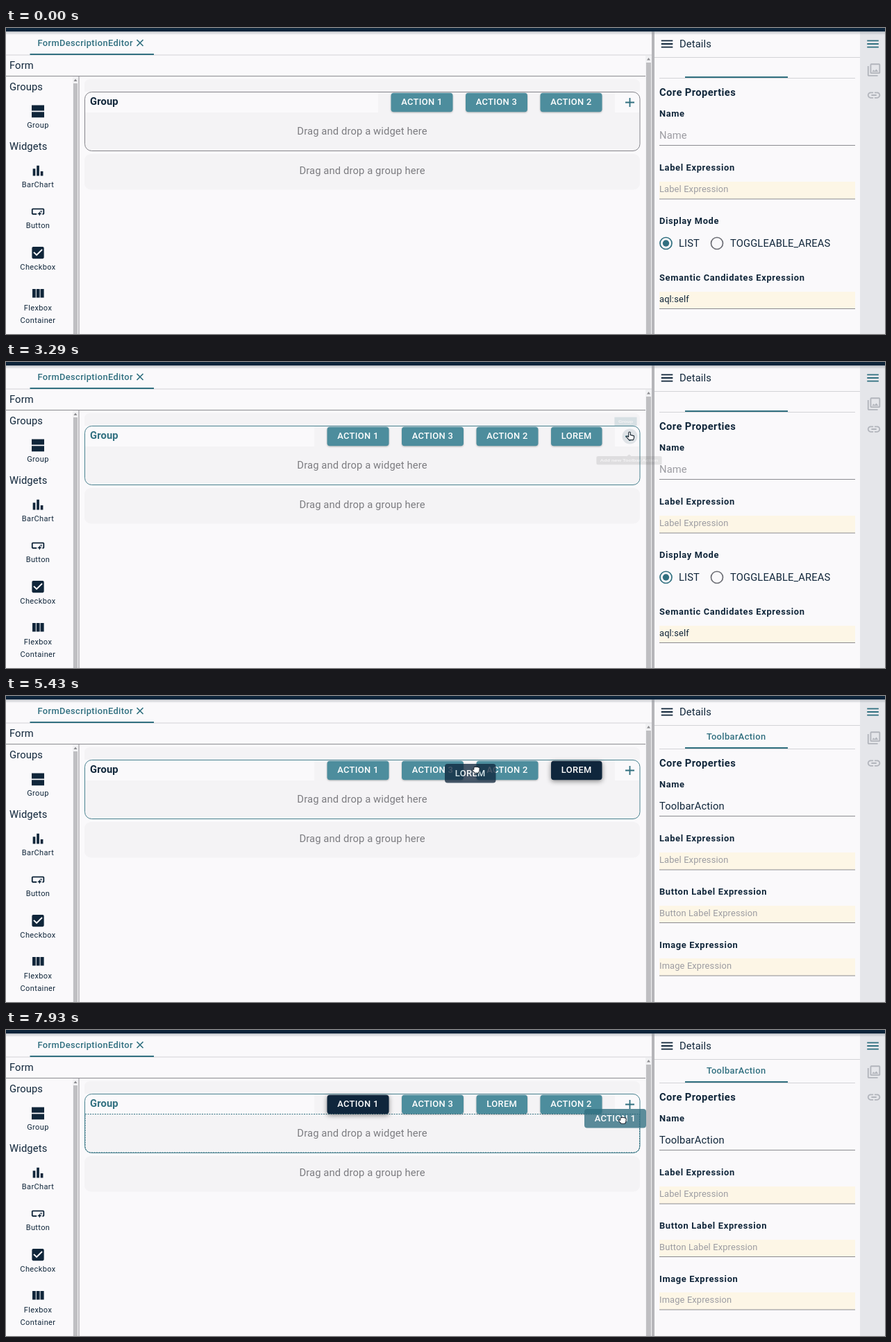
Animation of 1266 by 442 pixels, one loop 8 s. Source, as an HTML page:

```html
<!DOCTYPE html>
<html lang="en">
<head>
<meta charset="utf-8">
<title>Form editor</title>
<style>
html, body { margin: 0; width: 100%; height: 100%; overflow: hidden; background: #faf9fb; }
svg { display: block; width: 100vw; height: 100vh; }
text { font: 14.72px Roboto, sans-serif; letter-spacing: .14px; fill: #10263a; }
.s { font-size: 12.88px; }
.b { font-size: 12.88px; font-weight: 700; letter-spacing: .65px; }
.h { font-weight: 700; }
.m { font-size: 12.88px; font-weight: 500; letter-spacing: .37px; }
.c { font-size: 11.04px; letter-spacing: .37px; text-anchor: middle; }
.tip { font-size: 9.9px; font-weight: 500; letter-spacing: .05px; text-anchor: middle; fill: #fff; }
.mid { text-anchor: middle; }
.hint { fill: #9c9ca2; }
.drop { fill: #7c7c80; text-anchor: middle; }
.teal { fill: #317080; }
.zone { fill: #f4f3f5; }
.field { fill: #fdf6e6; }
.rule { stroke: #8b8b90; }
.thin { stroke: #d3d3d7; }
.white { fill: #fff; }
.pointer { fill: #fff; stroke: #1c2733; stroke-width: 1.1; stroke-linejoin: round; }
</style>
</head>
<body>
<svg viewBox="0 0 1266 442" preserveAspectRatio="none">
  <defs>
    <linearGradient id="shade" x2="0" y2="1">
      <stop stop-color="#8f959d" stop-opacity=".55"/><stop offset="1" stop-color="#8f959d" stop-opacity="0"/>
    </linearGradient>
    <path id="menu" d="M3 18h18v-2H3v2zm0-5h18v-2H3v2zm0-7v2h18V6H3z"/>
    <clipPath id="face"><rect width="73.5" height="27.5" rx="4"/></clipPath>
  </defs>
  <rect width="1266" height="442" fill="#faf9fb"/>

  <!-- editor tab and title -->
  <path class="thin" d="M0 39h930"/>
  <text class="m teal" x="45.5" y="26">FormDescriptionEditor</text>
  <path d="M188.500 17l9 9m0-9l-9 9" stroke="#317080" stroke-width="1.7"/>
  <path class="teal" d="M34.500 37h178.500v2h-178.500z"/>
  <text x="5" y="59">Form</text>
  <path class="rule" d="M0 69.500h921"/>

  <!-- palette -->
  <text x="5" y="89.500">Groups</text>
  <text x="5" y="176">Widgets</text>
  <g fill="#10263a">
    <path d="M37 111.500h18v8h-18zm0 9.700h18v8h-18z"/>
    <path transform="translate(35 195) scale(.92)" d="M4 9h4v11H4zm12 4h4v7h-4zm-6-9h4v16h-4z"/>
    <path transform="translate(35 254) scale(.92)" d="M22 9v6c0 1.100-.9 2-2 2h-1v-2h1V9H4v6h6v2H4c-1.100 0-2-.9-2-2V9c0-1.100.9-2 2-2h16c1.100 0 2 .9 2 2zm-7.500 10 1.090-2.410L18 15.500l-2.410-1.090L14.500 12l-1.090 2.410L11 15.500l2.410 1.090L14.500 19zm2.500-5 .62-1.380L19 12l-1.380-.62L17 10l-.62 1.380L15 12l1.380.62L17 14z"/>
    <path transform="translate(34.500 313) scale(.96)" d="M19 3H5c-1.110 0-2 .9-2 2v14c0 1.100.89 2 2 2h14c1.110 0 2-.9 2-2V5c0-1.100-.89-2-2-2zm-9 14l-5-5 1.410-1.410L10 14.170l7.590-7.590L19 8l-9 9z"/>
    <path d="M38 377h4.800v12.500h-4.800zm5.800 0h4.800v12.500h-4.800zm5.800 0h5v12.500h-5z"/>
  </g>
  <text class="c" x="46" y="144">Group</text>
  <text class="c" x="46" y="230">BarChart</text>
  <text class="c" x="46" y="289">Button</text>
  <text class="c" x="46" y="349">Checkbox</text>
  <text class="c" x="46" y="408">Flexbox</text>
  <text class="c" x="46" y="426">Container</text>
  <path fill="#f1f1f3" d="M96 70h8v372h-8zM921 40h9v402h-9z"/>
  <path fill="#bfbfc2" d="M97 80h6v362h-6zM922 50h7v392h-7z"/>
  <path fill="#8b8b8f" d="M97.500 77l2.500-3.500 2.500 3.500zM923 46.500l2.500-3.500 2.500 3.500z"/>
  <path class="rule" d="M105 70v372"/>

  <!-- form -->
  <path class="zone" d="M113 92V82q0-8 8-8H905q8 0 8 8V92z"/>
  <rect class="zone" x="113" y="92" width="800" height="86" rx="10"/>
  <path fill="#faf9fb" d="M114 122V102q0-9 9-9H903q9 0 9 9V122z"/>
  <rect class="zone" id="bar" y="93" height="29"/>
  <rect class="zone" x="113" y="182" width="800" height="51.500" rx="9"/>
  <rect id="frame" x="113.500" y="92.500" width="799.500" height="85" rx="10" fill="none"/>
  <path id="over" d="M114 121.500H912.500V168q0 9-9 9H123q-9 0-9-9z" fill="none" stroke="#317080" stroke-dasharray="2 1.500"/>
  <text class="h" id="title" x="121" y="111">Group</text>
  <text class="drop" x="513" y="154">Drag and drop a widget here</text>
  <text class="drop" x="513" y="210.500">Drag and drop a group here</text>
  <g id="actions"></g>
  <circle id="halo" cx="898.500" cy="107.500" r="11" fill="#dfe3e7"/>
  <path d="M892 107.500h13m-6.500-6.500v13" stroke="#317080" stroke-width="1.800"/>

  <!-- details -->
  <path fill="#b5b5b9" d="M930 5h4v437h-4z"/>
  <use href="#menu" transform="translate(941 12) scale(.92)" fill="#10263a"/>
  <text x="970" y="28">Details</text>
  <path class="thin" d="M934 42.500h296"/>
  <g id="panel">
    <path class="thin" d="M941 72.500h282"/>
    <path class="teal" d="M978 70h148v2h-148z"/>
    <text class="h" x="941" y="98" style="letter-spacing:.4px">Core Properties</text>
    <text class="b" x="941" y="128">Name</text>
    <text id="name" x="941" y="160"></text>
    <text class="b" x="941" y="206">Label Expression</text>
    <path class="field" d="M941 222h282v25h-282z"/>
    <text class="s hint" x="941" y="237">Label Expression</text>
    <path class="rule" d="M941 169.500h282M941 247h282"/>
    <g id="groupForm">
      <text class="b" x="941" y="283">Display Mode</text>
      <circle cx="950.500" cy="311" r="8.500" fill="none" stroke="#317080" stroke-width="1.700"/>
      <circle class="teal" cx="950.500" cy="311" r="4.700"/>
      <circle cx="1024" cy="311" r="8.500" fill="none" stroke="#6d6e75" stroke-width="1.700"/>
      <text x="969" y="316">LIST</text>
      <text x="1043" y="316">TOGGLEABLE_AREAS</text>
      <text class="b" x="941" y="365">Semantic Candidates Expression</text>
      <path class="field" d="M941 381h282v25h-282z"/>
      <text class="s" x="941" y="396">aql:self</text>
      <path class="rule" d="M941 405.500h282"/>
    </g>
    <g id="actionForm">
      <text class="m teal" x="1009" y="59">ToolbarAction</text>
      <text class="b" x="941" y="283">Button Label Expression</text>
      <path class="field" d="M941 299h282v25h-282zm0 76h282v25h-282z"/>
      <text class="s hint" x="941" y="314">Button Label Expression</text>
      <text class="b" x="941" y="360">Image Expression</text>
      <text class="s hint" x="941" y="390">Image Expression</text>
      <path class="rule" d="M941 323.500h282M941 400h282"/>
    </g>
  </g>

  <!-- side bar -->
  <path fill="#e5e6ea" d="M1230 5h36v437h-36z"/>
  <use href="#menu" class="teal" transform="translate(1237.500 12) scale(.92)"/>
  <g fill="#b2b5bc">
    <path transform="translate(1239 49.500) scale(.92)" d="M20 4v12H8V4h12m0-2H8c-1.100 0-2 .9-2 2v12c0 1.100.9 2 2 2h12c1.100 0 2-.9 2-2V4c0-1.100-.9-2-2-2zm-8.500 9.670l1.690 2.260 2.480-3.100L19 15H9zM2 6v14c0 1.100.9 2 2 2h14v-2H4V6H2z"/>
    <path transform="translate(1239 86) scale(.92)" d="M3.900 12c0-1.710 1.390-3.100 3.100-3.100h4V7H7c-2.760 0-5 2.240-5 5s2.240 5 5 5h4v-1.900H7c-1.710 0-3.100-1.390-3.100-3.100zM8 13h8v-2H8v2zm9-6h-4v1.900h4c1.710 0 3.100 1.390 3.100 3.100s-1.390 3.100-3.100 3.100h-4V17h4c2.760 0 5-2.240 5-5s-2.240-5-5-5z"/>
  </g>
  <rect y="5" width="1266" height="5" fill="url(#shade)"/>
  <rect width="1266" height="5" fill="#0c243a"/>

  <g id="groupTip">
    <rect class="teal" x="-20.500" y="-20" width="41" height="20"/>
    <text class="tip" y="-6.500">Group</text>
  </g>
  <g id="addTip">
    <path fill="#616161" d="M-57-0H-4L0-4 4 0H57q3 0 3 3V17q0 3-3 3H-57q-3 0-3-3V3q0-3 3-3z"/>
    <text class="tip" y="13.500">Add new Toolbar Action</text>
  </g>
  <g id="ghost"></g>
  <g id="cursor" class="pointer">
    <path d="M0 0v10.500l2.500-2.200 1.700 3.900 1.700-.8-1.700-3.700h3.400z"/>
    <path d="M0 0c1 0 1.300.6 1.300 1.400v3l4.200 1c1 .2 1.300 1 1.200 1.800l-.6 2.800-.8 1.600h-6l-3.600-4.200c-.6-.8.4-1.700 1.200-1.200l1.800 1V1.400C-1.300.6-1 0 0 0z"/>
    <path d="M-3 1q1-1.500 2-.3 1-1.500 2.200 0 1.200-1 2.200.4 1.600-.4 1.800 1.400l-.3 4-1.400 2.700h-5.500L-5.300 5.500q-.8-1.700 1-1.700l1 .6z"/>
  </g>
</svg>
<script>
const $ = id => document.getElementById(id);
const NAVY = [15, 38, 60], TEAL = [77, 141, 157], HOVER = [57, 118, 136];
const ADD = 3140, CLICK = 4060, DRAG = 4500, DROP = 6250, DRAG2 = 7300;

// time, x, y of the pointer's hot spot
const track = [
  [900, 760, 445], [1150, 800, 190], [1350, 822, 104], [1570, 878, 99], [1700, 898, 101],
  [3330, 898, 101], [3600, 840, 103], [3750, 832, 100], [4300, 832, 100], [DRAG, 830, 98],
  [5000, 740, 103], [5430, 677, 102], [5800, 662, 103], [DROP, 662, 103], [6570, 564, 116],
  [6850, 520, 104], [7000, 517, 106], [DRAG2, 517, 106], [7930, 888, 126]
];

const ramp = (t, from, span) => Math.max(0, Math.min(1, (t - from) / span));
const pulse = (t, from, to, span = 200) => ramp(t, from, span) - ramp(t, to, span);
const mix = (a, b, k) => a.map((v, i) => v + (b[i] - v) * k);
const rgb = c => `rgb(${c.map(Math.round)})`;
const show = (el, on) => el.style.display = on ? '' : 'none';
const move = (el, x, y) => el.setAttribute('transform', `translate(${x} ${y})`);

const face = (label, w) => `<rect width="${w}" height="27.5" rx="4"/>` +
  `<text class="m mid white" x="${w / 2}" y="17.800">${label}</text>`;

function button(label, w) {
  const el = document.createElementNS('http://www.w3.org/2000/svg', 'g');
  el.innerHTML = face(label, w);
  $('actions').append(el);
  return { el, w, label };
}

const one = button('ACTION 1', 89), three = button('ACTION 3', 89),
      two = button('ACTION 2', 89), lorem = button('LOREM', 73.5);
lorem.el.innerHTML += '<circle cx="46" cy="10" fill="#fff" clip-path="url(#face)"/>';
const ripple = lorem.el.lastChild;
const pointers = [...$('cursor').children];
let carried;

function pointerAt(t) {
  const i = track.findIndex(p => p[0] > t);
  if (i < 0) return track.at(-1).slice(1);
  const a = track[Math.max(0, i - 1)], b = track[i];
  const k = ramp(t, a[0], b[0] - a[0]), e = k * k * (3 - 2 * k);
  return [a[1] + (b[1] - a[1]) * e, a[2] + (b[2] - a[2]) * e];
}

function paint(b, hover, focus) {
  b.el.firstChild.style.fill = rgb(mix(mix(TEAL, HOVER, hover), NAVY, focus));
  b.el.style.filter = `drop-shadow(0 ${1 + focus}px ${1 + 2.5 * focus}px rgba(0,0,0,${.25 + .2 * focus}))`;
}

function grow(el, x, y, k) {
  const s = .75 + .25 * k;
  el.setAttribute('transform', `translate(${x} ${y}) scale(${s} ${s * s})`);
  el.style.opacity = k;
}

function carry(b, x, y) {
  if (b !== carried) $('ghost').innerHTML = b ? face(b.label, b.w) : '';
  carried = b;
  if (!b) return;
  const first = b === one;
  $('ghost').style.opacity = first ? .79 : .76;
  $('ghost').firstChild.style.fill = first ? '#316f81' : rgb(NAVY);
  move($('ghost'), x - (first ? 55 : 45), y - (first ? 12 : 4));
}

function draw(t) {
  const [x, y] = pointerAt(t), added = t >= 3250;
  const order = !added ? [one, three, two] : t < 6300 ? [one, three, two, lorem] : [one, three, lorem, two];
  show(lorem.el, added);
  let right = 858.5;
  for (const b of [...order].reverse()) {
    move(b.el, right - b.w, 93.7);
    right -= b.w + 18.5;
  }
  $('bar').setAttribute('x', right);
  $('bar').setAttribute('width', 877 - right);

  paint(one, pulse(t, 6720, 9000), ramp(t, 7150, 150));
  paint(two, pulse(t, 1280, 1550), 0);
  paint(three, pulse(t, 6420, 6560) * .4, 0);
  paint(lorem, pulse(t, 3550, CLICK), pulse(t, CLICK - 60, 6480, 210));
  ripple.setAttribute('r', 17 * ramp(t, CLICK, 130));
  ripple.style.opacity = .25 * pulse(t, CLICK, 4330);

  const holding = t >= DRAG && t < DROP || t >= DRAG2;
  carry(holding ? t < DROP ? lorem : one : null, x, y);
  show($('over'), t > DRAG2 && y > 121);
  $('frame').style.stroke = t > 1130 ? '#4a8391' : '#85858b';
  $('title').style.fill = t >= ADD && t < CLICK || t > 7430 ? '#317080' : '#10263a';
  $('halo').style.opacity = pulse(t, 1650, 3380);
  grow($('groupTip'), 892.5, 92, pulse(t, 1130, ADD, 176) + pulse(t, 3480, CLICK, 176) + pulse(t, 6350, 7150, 176));
  grow($('addTip'), 897.5, 136, pulse(t, 1820, ADD, 176));

  const action = t >= 4330;
  move($('panel'), 0, action ? 4 : 0);
  show($('groupForm'), !action);
  show($('actionForm'), action);
  $('name').textContent = action ? 'ToolbarAction' : 'Name';
  $('name').setAttribute('class', action ? '' : 'hint');

  const arrow = t < 1290 || t > 1490 && t < 1620 || t > 3390 && t < 3480;
  const kind = holding ? 2 : arrow ? 0 : 1;
  show($('cursor'), t >= 900);
  pointers.forEach((p, i) => show(p, i === kind));
  move($('cursor'), x, y);
}

function tick() {
  draw(performance.now() % 8000);
  requestAnimationFrame(tick);
}
tick();
</script>
</body>
</html>
```
